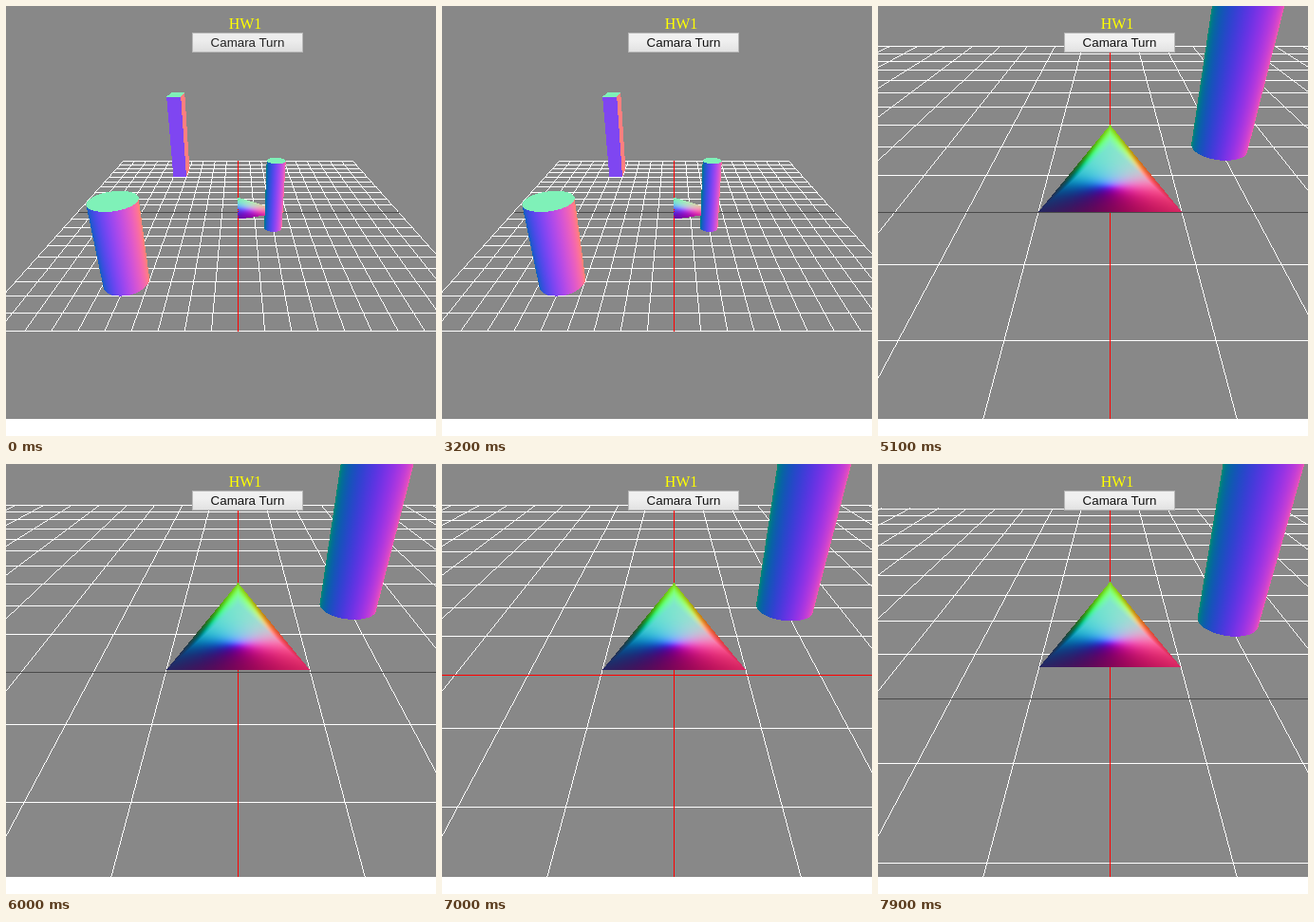
Recreate the animation shown at these times as an HTML page with a canvas. Size 453x453 px, loop 8 s.

```html
<!DOCTYPE html>
<html lang="en">
<head>
<meta charset="utf-8">
<title>HW1</title>
<style>
  html, body { margin: 0; width: 100%; height: 100%; overflow: hidden; background: #fff; }
  canvas { position: absolute; left: 0; top: 0; }
  .title {
    position: absolute; left: 202px; top: 10px; width: 100px;
    font: 16px/18px "Liberation Serif", serif; text-align: center; color: #ff0;
  }
  .turn {
    position: absolute; left: 196px; top: 28px; width: 117px; height: 21px;
    box-sizing: border-box; border: 1px solid #b8b8b8;
    font: 13.333px/19px "Liberation Sans", sans-serif; text-align: center; color: #222;
    background: linear-gradient(#ededed 38%, #dedede);
    animation: hover 8s step-end infinite;
  }
  @keyframes hover {
    6.25%, 100% { color: #111; background: linear-gradient(#f0f0f0 38%, #e2e2e2); }
  }
</style>
</head>
<body>
<canvas id="scene" width="453" height="435"></canvas>
<div class="title">HW1</div>
<div class="turn">Camara Turn</div>
<script>
const W = 453, H = 435, CX = 244.5, CY = 217.01;
const FOCAL = 218 / Math.tan(Math.PI / 6);
const LOOP = 8000, STEP = 100, SWITCH = 3300, NEAR = 0.5;
const ctx = document.getElementById('scene').getContext('2d');
const image = ctx.createImageData(W, H);
const pixels = new Uint32Array(image.data.buffer);
const depth = new Float32Array(W * H);

const rgb = (r, g, b) => (255 << 24 | b << 16 | g << 8 | r) >>> 0;
const GREY = rgb(136, 136, 136), WHITE = rgb(255, 255, 255);
const RED = rgb(255, 0, 0), DARK = rgb(74, 74, 74);

const sub = (a, b) => a.map((v, i) => v - b[i]);
const add = (a, b) => a.map((v, i) => v + b[i]);
const dot = (a, b) => a[0] * b[0] + a[1] * b[1] + a[2] * b[2];
const unit = a => a.map(v => v / Math.hypot(...a));
const cross = (a, b) => [
  a[1] * b[2] - a[2] * b[1], a[2] * b[0] - a[0] * b[2], a[0] * b[1] - a[1] * b[0]];

// A mesh is a list of triangles, each of three [position, normal] pairs.
function cylinder(x, z, r, h, n = 32) {
  const tris = [], up = [0, 1, 0];
  const ring = (i, y) => {
    const a = 2 * Math.PI * i / n, c = Math.cos(a), s = Math.sin(a);
    return [[x + r * c, y, z + r * s], [c, 0, s]];
  };
  for (let i = 0; i < n; i++) {
    const a = ring(i, 0), b = ring(i + 1, 0), c = ring(i, h), d = ring(i + 1, h);
    tris.push([a, b, c], [b, d, c], [[c[0], up], [d[0], up], [[x, h, z], up]]);
  }
  return tris;
}

function box(lo, hi) {
  const tris = [];
  for (let axis = 0; axis < 3; axis++) for (const side of [0, 1]) {
    const normal = [0, 0, 0];
    normal[axis] = side * 2 - 1;
    const corner = (u, v) => {
      const p = [];
      p[axis] = (side ? hi : lo)[axis];
      p[(axis + 1) % 3] = (u ? hi : lo)[(axis + 1) % 3];
      p[(axis + 2) % 3] = (v ? hi : lo)[(axis + 2) % 3];
      return [p, normal];
    };
    const a = corner(0, 0), b = corner(1, 0), c = corner(1, 1), d = corner(0, 1);
    tris.push([a, b, c], [a, c, d]);
  }
  return tris;
}

// Tetrahedron pointing along +x, with smoothed vertex normals.
function pointer() {
  const left = [0, 0, -1], right = [0, 0, 1], top = [0, 1, 0], tip = [3, 0, 0];
  const corners = [left, right, top, tip], middle = [0.75, 0.25, 0];
  const normals = corners.map(() => [0, 0, 0]);
  const faces = [[0, 1, 2], [0, 2, 3], [1, 2, 3], [0, 1, 3]];
  for (const f of faces) {
    const [a, b, c] = f.map(i => corners[i]);
    let n = cross(sub(b, a), sub(c, a));
    if (dot(n, sub(a, middle)) < 0) n = n.map(v => -v);
    for (const i of f) normals[i] = add(normals[i], n);
  }
  return faces.map(f => f.map(i => [corners[i], unit(normals[i])]));
}

const solids = [
  ...cylinder(2, 2, 0.5, 4),
  ...cylinder(-5, 7, 1, 4),
  ...box([-5, 0, -8], [-4, 6, -6])
];
const agent = pointer();

let eye, axes;
function lookAt(from, to) {
  const back = unit(sub(from, to)), right = unit(cross([0, 1, 0], back));
  eye = from;
  axes = [right, cross(back, right), back];
}
const turn = v => axes.map(a => dot(a, v));
const toView = p => turn(sub(p, eye));
function project(v) {
  const q = -1 / v[2];
  return { x: CX + FOCAL * v[0] * q, y: CY - FOCAL * v[1] * q, q };
}

function drawTriangle(tri) {
  const views = tri.map(([p]) => toView(p));
  if (views.some(v => v[2] > -0.1)) return;
  const [a, b, c] = views.map(project);
  const [na, nb, nc] = tri.map(([, n]) => turn(n));
  const area = (b.x - a.x) * (c.y - a.y) - (b.y - a.y) * (c.x - a.x);
  if (Math.abs(area) < 1e-6) return;
  const x0 = Math.max(0, Math.floor(Math.min(a.x, b.x, c.x)));
  const x1 = Math.min(W - 1, Math.ceil(Math.max(a.x, b.x, c.x)));
  const y0 = Math.max(0, Math.floor(Math.min(a.y, b.y, c.y)));
  const y1 = Math.min(H - 1, Math.ceil(Math.max(a.y, b.y, c.y)));
  for (let y = y0; y <= y1; y++) for (let x = x0; x <= x1; x++) {
    const px = x + 0.5, py = y + 0.5;
    let u = ((b.x - px) * (c.y - py) - (b.y - py) * (c.x - px)) / area;
    let v = ((c.x - px) * (a.y - py) - (c.y - py) * (a.x - px)) / area;
    let w = 1 - u - v;
    if (u < 0 || v < 0 || w < 0) continue;
    u *= a.q; v *= b.q; w *= c.q;
    const q = u + v + w, at = y * W + x;
    if (q <= depth[at]) continue;
    depth[at] = q;
    const nx = u * na[0] + v * nb[0] + w * nc[0];
    const ny = u * na[1] + v * nb[1] + w * nc[1];
    const nz = u * na[2] + v * nb[2] + w * nc[2];
    const k = 127.5 / (Math.hypot(nx, ny, nz) || 1);
    pixels[at] = rgb(127.5 + nx * k, 127.5 + ny * k, 127.5 + nz * k);
  }
}

function drawLine(from, to, axis) {
  let a = toView(from), b = toView(to);
  if (a[2] > b[2]) [a, b] = [b, a];
  if (a[2] > -NEAR) return;
  if (b[2] > -NEAR) {
    const t = (-NEAR - a[2]) / (b[2] - a[2]);
    b = a.map((v, i) => v + (b[i] - v) * t);
  }
  const p = project(a), r = project(b);
  const dx = r.x - p.x, dy = r.y - p.y;
  const flat = Math.abs(dx) > Math.abs(dy);
  // Sample at pixel centres along the longer direction.
  const [start, span] = flat ? [p.x, dx] : [p.y, dy];
  const lo = Math.max(0, Math.ceil(Math.min(start, start + span) - 0.5));
  const hi = Math.min(flat ? W : H, Math.max(start, start + span) + 0.5);
  for (let i = lo; i + 0.5 < hi; i++) {
    const t = (i + 0.5 - start) / span;
    const x = flat ? i : Math.floor(p.x + dx * t);
    const y = flat ? Math.floor(p.y + dy * t) : i;
    if (x < 0 || y < 0 || x >= W || y >= H) continue;
    const q = p.q + (r.q - p.q) * t, at = y * W + x;
    if (q < depth[at]) continue;
    // The centre lines lose their colour on odd rows and columns.
    pixels[at] = !axis ? WHITE : (flat ? y : x) % 2 ? DARK : RED;
  }
}

function drawGrid() {
  const pair = k => {
    drawLine([-10, 0, k], [10, 0, k], !k);
    drawLine([k, 0, -10], [k, 0, 10], !k);
  };
  for (let k = 10; k > 0; k--) { pair(k); pair(-k); }
  pair(0);
}

// Time, distance travelled
const path = [[4400, 0], [5100, 0.02], [6000, 0.06], [6200, 0.07],
  [7000, 0.111], [7100, 0.12], [7500, 0.173]];

function travel(t) {
  if (t <= path[0][0]) return 0;
  if (t >= 7500) {
    const s = (t - 7500) / 1000;
    return 0.173 + 0.25 * s + 2.12 * s * s;
  }
  const i = path.findIndex(p => p[0] > t);
  const [t0, d0] = path[i - 1], [t1, d1] = path[i];
  return d0 + (d1 - d0) * (t - t0) / (t1 - t0);
}

function render(t) {
  const d = travel(t);
  const lead = 0.035 * (d - travel(t - STEP)) * 1000 / STEP;
  if (t < SWITCH) lookAt([0, 10, 20], [0, 0, 0]);
  else lookAt([d - 4, 3, 0], [d, 0, 0]);
  pixels.fill(GREY);
  depth.fill(0);
  solids.forEach(drawTriangle);
  for (const tri of agent) {
    drawTriangle(tri.map(([p, n]) => [add(p, [d + lead, 0, 0]), n]));
  }
  drawGrid();
  ctx.putImageData(image, 0, 0);
}

let shown = -1;
function tick() {
  const t = Math.floor(performance.now() % LOOP / STEP) * STEP;
  if (t !== shown) render(shown = t);
  requestAnimationFrame(tick);
}
tick();
</script>
</body>
</html>
```
